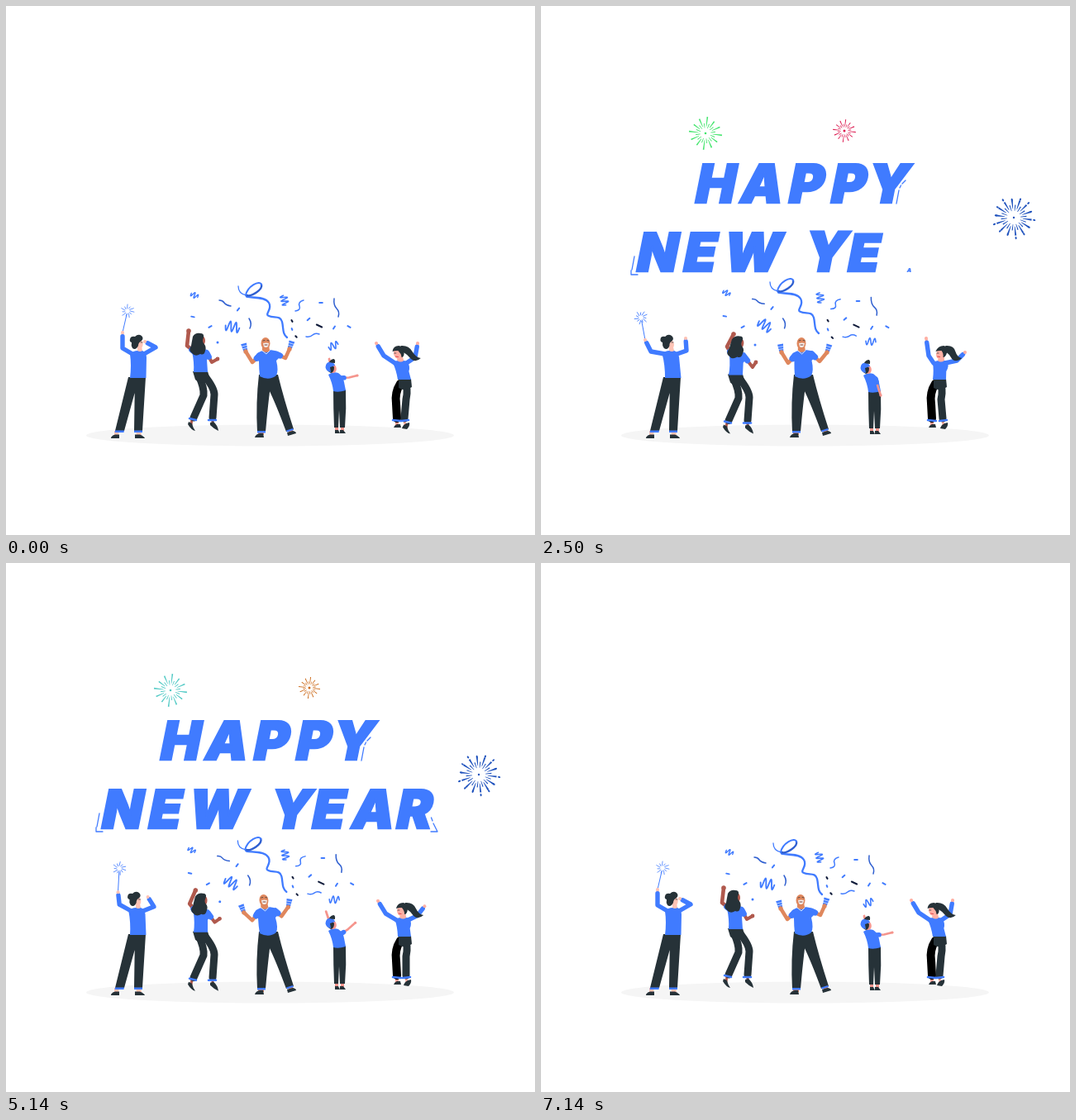
These frames come from a looping animation (640x640 px, 7210 ms). An HTML page with a canvas:

```html
<!DOCTYPE html>
<html lang="en">
<head>
<meta charset="utf-8">
<title>Happy New Year</title>
<style>
  html, body { margin: 0; width: 100%; height: 100%; overflow: hidden; background: #fff; }
  canvas { display: block; width: 100vw; height: 100vh; }
</style>
</head>
<body>
<canvas id="stage" width="640" height="640"></canvas>
<script>
const g = document.getElementById('stage').getContext('2d');
const LOOP = 7210, CUT = 7140, FPS = 0.014;
const BLUE = '#407bff', DEEP = '#2f5fd0', DARK = '#263238', BLACK = '#000';
const KEYS = [0, 1070, 2500, 3360, 4430, 5790, 7070];
let t = 0;

// ---- helpers -------------------------------------------------------------
// Smooth curve through six key values; the swing closes near the third one.
function at(values) {
  const v = [...values, values[2]], last = KEYS.length - 1;
  let i = 0;
  while (i < last - 1 && t >= KEYS[i + 1]) i++;
  const span = KEYS[i + 1] - KEYS[i], u = Math.min(1, (t - KEYS[i]) / span);
  const slope = j => j === 0 || j === last ? 0 : (v[j + 1] - v[j - 1]) / (KEYS[j + 1] - KEYS[j - 1]);
  const u2 = u * u, u3 = u2 * u;
  return v[i] * (2 * u3 - 3 * u2 + 1) + v[i + 1] * (3 * u2 - 2 * u3)
    + span * (slope(i) * (u3 - 2 * u2 + u) + slope(i + 1) * (u3 - u2));
}
const point = (...xy) => [0, 1].map(k => at(xy.filter((_, i) => i % 2 === k)));
const mix = (a, b, u) => [a[0] + (b[0] - a[0]) * u, a[1] + (b[1] - a[1]) * u];

function fill(color, d) {
  g.fillStyle = color;
  g.fill(new Path2D(d));
}
function stroke(color, width, d) {
  g.strokeStyle = color;
  g.lineWidth = width;
  g.stroke(new Path2D(d));
}
const line = (color, width, ...pts) => stroke(color, width, 'M' + pts.join('L'));
function oval(color, x, y, rx, ry = rx, turn = 0) {
  g.fillStyle = color;
  g.beginPath();
  g.ellipse(x, y, rx, ry, turn, 0, 7);
  g.fill();
}
function placed(x, y, turn, draw) {
  g.save();
  g.translate(x, y);
  g.rotate(turn);
  draw();
  g.restore();
}
function leaning(dx, hipY, headY, draw) {
  const k = dx / (hipY - headY);
  g.save();
  g.transform(1, 0, -k, 1, k * hipY, 0);
  draw();
  g.restore();
}
function longSleeve(shoulder, elbow, hand, skin) {
  const cuff = mix(elbow, hand, 0.75);
  line(skin, 3.2, cuff, hand);
  line(BLUE, 5.4, shoulder, elbow, cuff);
  oval(skin, ...hand, 2);
}
function shortSleeve(shoulder, elbow, hand, skin, width = 4) {
  line(skin, width, shoulder, elbow, hand);
  line(BLUE, width + 3, shoulder, mix(shoulder, elbow, 0.4));
  oval(skin, ...hand, width * 0.6);
}

// ---- people --------------------------------------------------------------
function sparklerMan() {
  const skin = '#ffc3b5', lean = at([0, 4, -5, -2, 0, -5]);
  fill(skin, 'M131,514h6l-1,5h-5zM157,514h6l1,5h-6z');
  fill(DARK, 'M148,449h13l-18,65h-11zM156,449h13l-4,65h-10z');
  fill(BLUE, 'M132,513.500h11l-.5,2.500h-11zM155,513.500h10v2.500h-10z');
  fill(DARK, 'M127,523q0,-3 5,-4.500h5v4.500zM156,518.500h6q5,2 6,4.500h-12z');

  const burst = point(147, 369, 141, 369, 121, 377, 132, 372, 139, 369, 133, 371);
  const hand = point(141, 395, 140, 398, 126, 404, 133, 400, 138, 397, 132, 400);
  line(BLUE, 1, hand, mix(hand, burst, 0.84));
  placed(...burst, Math.floor(t * FPS) * 0.7, () => {
    for (let i = 0; i < 11; i++) {
      const a = i * Math.PI * 2 / 11, r = i % 2 ? 6 : 8;
      line(BLUE, 0.8, [Math.cos(a) * 3.2, Math.sin(a) * 3.2], [Math.cos(a + 0.15) * r, Math.sin(a + 0.15) * r]);
    }
  });
  longSleeve([153 + lean * 0.6, 421], point(141, 414, 142, 413, 133, 418, 136, 415, 139, 413, 135, 414), hand, skin);
  longSleeve([167 + lean * 0.5, 421], point(181, 413, 184, 423, 176, 417, 180, 418, 182, 418, 176, 414),
    point(168, 406, 189, 408, 175, 402, 178, 405, 178, 405, 167, 403), skin);
  leaning(lean, 450, 407, () => {
    fill(BLUE, 'M150,421Q154,417 159,417L165,417Q170,419 170,425L169.500,450H150Q152,435 150,421Z');
    fill(skin, 'M159,411h5l1,6q-3,2 -6,0z');
    oval(skin, 161.500, 409, 4.200, 5.500);
    fill(DARK, 'M150,403Q151,399 156,400Q160,396 164,399Q167,402 164,405Q160,407 160,411Q157,417 153,414Q151,411 152,407Q149,406 150,403Z');
    line(DARK, 0.7, [163, 407], [165, 407]);
  });
}

function dancingWoman() {
  const skin = '#b0594d', lean = at([0, -3, 4, 10, 5, 1]), bob = at([0, 4, 3.5, 1, 3.5, 3.5]);
  const leftHand = point(221, 393, 220, 400, 233, 397, 241, 396, 235, 396, 226, 396);
  const leftElbow = point(219, 411, 218, 416, 225, 412, 232, 410, 225, 411, 221, 413);
  g.save();
  g.translate(0, bob);
  line(skin, 3, [225, 500], [224, 506]);
  line(skin, 3, [250, 500], [250, 506]);
  stroke(DARK, 9, 'M240,447Q252,462 252,470L250,498');
  stroke(DARK, 9, 'M233,447Q240,462 239,471L227,498');
  fill(DARK, 'M226,442h18l3,10q-9,8 -18,0z');
  line(BLUE, 2.5, [222, 499], [230, 501]);
  line(BLUE, 2.5, [245, 501], [254, 501]);
  fill(DARK, 'M221,503l4,2q1,5 4,9q-5,-1 -9,-8zM247,504l4,-1q5,4 6,11q-5,-2 -10,-7z');
  g.restore();
  shortSleeve([229 + lean * 0.6, 419 + bob], leftElbow, leftHand, skin, 4.6);
  shortSleeve([243 + lean * 0.6, 420 + bob], point(249, 431, 249, 435, 256, 437, 257, 437, 254, 437, 252, 433),
    point(256, 427, 255, 430, 260, 431, 264, 432, 261, 431, 257, 430), skin, 4);
  g.save();
  g.translate(0, bob);
  leaning(lean, 443, 408, () => {
    fill(BLUE, 'M225,418Q234,413 244,416L247,423L243,428L244,443H227Q228,432 225,418Z');
    oval(skin, 237, 405, 4, 6);
    fill(DARK, 'M226,400Q229,395 235,396Q240,396 239,401Q237,405 239,408Q243,412 241,417Q240,423 235,421Q229,425 225,420Q220,417 224,411Q225,405 226,400Z');
  });
  g.restore();
}

function cup([x, y], turn) {
  placed(x, y, turn, () => {
    fill(BLUE, 'M-2.500,-1L-3.500,-10H3.500L2.500,-1Z');
    stroke('#fff', 0.6, 'M-3,-7H3M-3,-4H3');
  });
}
function cupMan() {
  const skin = '#df875d', lean = at([0, -3, 1, 3, 0, -3]);
  fill(skin, 'M305,514h7v5h-7zM341,511h6v5h-5z');
  fill(DARK, 'M306,446h16Q318,470 314,515H304Q302,480 306,446ZM312,446h17Q336,475 348,512L339,515Q326,480 317,462Z');
  fill(BLUE, 'M304,514h10v2.500h-10zM339,513.500l8,-2.500 1,2 -8,2.500z');
  fill(DARK, 'M301,522q1,-4 6,-5h4l1,5zM340,516l7,-2q4,1 4,3l-10,3z');
  const left = point(290, 418, 287, 427, 291, 419, 295, 416, 290, 419, 287, 425);
  const right = point(343, 415, 340, 419, 346, 419, 347, 417, 343, 416, 341, 417);
  cup(left, at([-0.25, -0.5, -0.15, 0, -0.25, -0.4]));
  cup(right, at([0.3, 0.1, 0.3, 0.4, 0.3, 0.1]));
  shortSleeve([307 + lean * 0.6, 423], point(298, 431, 299, 435, 299, 432, 300, 429, 298, 431, 298, 433), left, skin, 4.4);
  shortSleeve([327 + lean * 0.6, 421], point(338, 426, 331, 431, 337, 430, 339, 427, 336, 427, 332, 428), right, skin, 4.4);
  leaning(lean, 450, 408, () => {
    fill(BLUE, 'M304,420Q310,416 316,417Q324,415 329,419L332,424L327,429Q330,441 327,447Q318,454 307,448Q306,438 306,430L301,424Z');
    fill(skin, 'M310,410h8l1,7q-4,4 -9,0z');
    stroke('#fff', 0.8, 'M310,417L315,421L319,417');
    oval(skin, 314, 408, 5.5, 7);
    fill('#f4f0ee', 'M311,408q4,-1 7,0l-1,4q-3,2 -5,0z');
    line('#7d3d2e', 1, [313, 410], [316, 410]);
    line(DARK, 0.7, [311, 405], [313, 404.500]);
    line(DARK, 0.7, [316, 404.500], [318, 405]);
  });
}

function kid() {
  const skin = '#f5958d', bob = at([-1, 0, 0, -1, -4, 0]);
  const back = point(391, 427, 418, 467, 410, 473, 421, 456, 390, 424, 391, 429);
  const front = point(425, 447, 419, 458, 411, 471, 425, 452, 421, 433, 423, 443);
  const shoulder = [405, 451 + bob];
  line(skin, 2.8, [396, 450 + bob], mix([396, 450 + bob], back, 0.5), back);
  g.save();
  g.translate(0, bob);
  fill(skin, 'M398,509h4v6h-4zM405,509h4v6h-4z');
  fill(DARK, 'M396,465H411Q412,488 410,511H404L403,490L402,511H397Q396,488 396,465Z');
  fill(DARK, 'M398,514h4l2,4h-6zM404,514h4l3,4h-7z');
  fill(BLUE, 'M390,447Q395,443 402,445Q408,449 409,456L411,466Q402,469 396,467Q395,457 390,447Z');
  oval(skin, 396, 440, 3.8, 5);
  fill(DARK, 'M388,437q7,-3 9,1q0,6 -4,7q-5,-2 -5,-8z');
  fill(BLUE, 'M386.500,438Q387,431 393,431.500Q397,432 398,436L392,438L393,444Q387,443 386.500,438Z');
  fill(DARK, 'M391,432q2,-4 6,-4q2,2 1,5q-3,0 -7,-1z');
  g.restore();
  const bend = mix(shoulder, front, 0.5);
  shortSleeve(shoulder, [bend[0], bend[1] + 1], front, skin, 2.6);
}

function ponytailWoman() {
  const skin = '#ffb0a4', lean = at([-5, 4, 4, 0, -2.5, 1]), step = at([0, 4.5, 4, 3.5, 3, 1.5]);
  const shade = '#f39c92';
  fill(shade, 'M471,501h4v6h-4z');
  stroke(BLACK, 10, 'M477,457Q470,468 472,481L473,499');
  line(BLUE, 2.5, [468, 501], [478, 502]);
  fill(DARK, 'M469,510q1,-3 4,-4h4l1,4z');
  line(skin, 3, [482 + step, 501], [483 + step, 507]);
  stroke(DARK, 9, `M482,456Q487,462 484,476L${482 + step},499`);
  fill(DARK, 'M475,451h15l1,10q-8,6 -16,1z');
  line(BLUE, 2.5, [478 + step, 502], [487 + step, 501]);
  placed(step, 0, 0, () => fill(DARK, 'M479,511q1,-4 5,-6l4,-1q1,4 -3,8z'));
  longSleeve([473 + lean * 0.5, 432], point(457, 423, 468, 422, 469, 423, 461, 424, 459, 424, 461, 424),
    point(448, 408, 463, 402, 466, 402, 452, 408, 450, 410, 452, 407), skin);
  longSleeve([487 + lean * 0.5, 432], point(495, 425, 500, 429, 503, 429, 499, 424, 496, 425, 500, 428),
    point(498, 408, 511, 417, 513, 419, 505, 411, 503, 411, 510, 419), skin);
  leaning(lean, 452, 421, () => {
    fill(BLUE, 'M471,431Q480,427 489,430Q492,436 489,442L490,452H474Q474,440 471,431Z');
    fill(DARK, 'M484,411Q494,410 497,418Q500,425 506,426Q499,432 494,427Q490,421 485,418Z');
    fill(skin, 'M478,422h6l1,7q-4,3 -8,0z');
    oval(skin, 479, 421, 5, 6);
    fill(DARK, 'M473,418Q475,411 482,411Q488,412 487,419Q486,425 483,425Q483,420 480,417Q476,417 473,418Z');
    line(DARK, 0.7, [475, 420], [477, 420]);
    line('#e2474f', 1, [476, 424], [479, 424.500]);
  });
}

// ---- confetti ------------------------------------------------------------
function squiggle(x, y, size, turn, waves = 5) {
  placed(x, y, turn, () => {
    const pts = Array.from({ length: 31 }, (_, i) =>
      [size * (i / 15 - 1), Math.sin(i / 30 * Math.PI * waves) * size * 0.7]);
    line(BLUE, 1 + size / 10, ...pts);
  });
}
function confetti() {
  const spread = at([1, 1.02, 1.04, 1.06, 1.055, 1.025]);
  const far = (x, y) => [318 + (x - 318) * spread, 385 + (y - 385) * (1 + (spread - 1) * 2)];
  const spin = (spread - 1) * 10;

  squiggle(...far(228, 350), 4.5, 0.6 + spin * 0.3, 4);
  squiggle(...point(274, 388, 271, 386, 271, 386, 271, 386, 272, 386, 273, 387), 8.5, 0.2 + spin);
  squiggle(...point(337, 356, 338, 355, 338, 353, 338, 352, 338, 352, 338, 354), 6, 1.3 + spin * 0.3);
  squiggle(...point(396, 411, 397, 408, 399, 406, 400, 405, 398, 406, 397, 408), 6, -0.3 + spin, 4);

  const curves = [
    [265, 359, 'M-7,-3Q-3,-3 -1,0T7,4'],
    [355, 362, 'M5,-6Q-2,-4 0,1T-5,7'],
    [399, 365, 'M-2,-11Q-3,-3 1,1T3,11'],
    [371, 399, 'M-8,1Q-3,2 0,-1T8,-2'],
    [295, 384, 'M-1,-6Q3,0 0,6'],
  ];
  curves.forEach(([x, y, d], i) =>
    placed(...far(x, y), spin * (i % 2 ? 0.3 : -0.2), () => stroke(i % 2 ? BLUE : DEEP, 1.5, d)));

  const dashes = [
    [226, 376, 0.2], [247, 388, -0.5], [281, 367, -0.9], [366, 379, -0.7], [381, 359, 0],
    [397, 389, -1], [415, 388, 0.5], [346, 391, 1.2], [346, 381, 1], [351, 400, 0.8], [379, 387, 0.45],
  ];
  dashes.forEach(([x, y, turn], i) => {
    const half = i === 10 ? 3.5 : i > 6 ? 1 : 1.8;
    placed(...far(x, y), turn, () => line(i > 7 ? '#101b3a' : BLUE, 2, [-half, 0], [half, 0]));
  });
  oval(BLUE, ...point(256, 407, 257, 408, 259, 410, 261, 411, 261, 411, 257, 409), 1.5);

  placed(...point(0, 0, -6, -2, -4, -5, -3, -7, -1, -5, -1, -2), 0, () => {
    stroke(BLUE, 1.3, 'M281,339C281,345 285,349 291,350');
    stroke(BLUE, 2.3, 'M291,350C288,355 312,349 318,359C323,367 312,373 318,375C324,378 332,374 334,382C336,390 334,396 340,401');
    stroke(DEEP, 2.4, 'M291,350C297,352 311,343 309,337');
    stroke(BLUE, 2, 'M309,337C307,331 292,339 290,350');
  });
}

// ---- fireworks -----------------------------------------------------------
const FIREWORKS = [
  { x: 128, y: 173, r: 28, rays: 24, starts: [800, 3480], colors: ['#dbe67a', '#dbe67a'] },
  { x: 199, y: 154, r: 22, rays: 24, starts: [1780, 4415], colors: ['#41e56b', '#4fc9c4'] },
  { x: 572, y: 256, r: 26, rays: 28, starts: [2060, 4690], colors: ['#1f52bd', '#1f52bd'], tips: true },
  { x: 367, y: 151, r: 25, rays: 24, starts: [2400, 5050], colors: ['#dc1a50', '#cc6a1a'] },
  { x: 489, y: 163, r: 53, rays: 40, starts: [2740, 5370], colors: ['#10e0b6', '#16c4d2'], tips: true, ring: true },
];
function firework({ x, y, r, rays, starts, colors, tips, ring }) {
  starts.forEach((start, n) => {
    const age = t - start;
    if (age < 0 || age > 1060) return;
    const grow = 1 - (1 - Math.min(1, age / 300)) ** 2;
    const R = r * grow * (1 - Math.max(0, age - 420) / 3500), color = colors[n];
    g.save();
    g.globalAlpha = Math.min(1, Math.max(0, (1060 - age) / 260));
    g.translate(x, y);
    for (let i = 0; i < rays; i++) {
      g.save();
      g.rotate(i * Math.PI * 2 / rays + 0.12);
      const long = i % 2 === 0, uneven = 1 - (i % 3) * 0.06;
      const from = R * (long ? 0.42 : 0.32), to = R * (long ? (tips ? 0.84 : uneven) : 0.6);
      const w = R * (ring ? 0.022 : 0.04) * (long ? 1 : 0.6);
      fill(color, `M${from},-0.3L${to},${-w}L${to},${w}L${from},0.3Z`);
      if (tips && long) oval(color, R * uneven - 1, 0, w * 1.6, w);
      g.restore();
    }
    if (ring) {
      g.beginPath();
      g.arc(0, 0, R * 0.2, 0, 7);
      g.strokeStyle = color;
      g.lineWidth = R * 0.07;
      g.stroke();
      for (let i = 0; i < 16; i++) {
        const a = i * Math.PI / 8;
        oval(color, Math.cos(a) * R * 0.25, Math.sin(a) * R * 0.25, R * 0.035);
      }
    } else oval(color, 0, 0, tips ? 1.2 : r * 0.06);
    g.restore();
  });
}

// ---- greeting ------------------------------------------------------------
const LINES = [
  { text: 'HAPPY', y: 239, centers: [213, 268.5, 323.5, 374.5, 422] },
  { text: 'NEWYEAR', y: 322, centers: [142.5, 194, 257.5, 346, 392, 445.5, 497] },
];
const MARKS = {
  4: 'M430,239L433,223M434,220L435.500,217M437,215L441,211',
  5: 'M113,303L110,319M109,320V325H117',
  11: 'M514.500,308L516,312M517,315L522,325H514',
};
const CAP = 49, SLANT = 0.2, LETTER_DELAY = 211;
function pop(age) {
  if (age <= 0) return 0;
  if (age < 340) return 1.1 * Math.sin(Math.PI / 2 * age / 340);
  return 1 + 0.1 * (1 + Math.cos(Math.PI * Math.min(1, (age - 340) / 160))) / 2;
}
function greeting() {
  g.font = '900 64.5px Inter, "Open Sans", sans-serif';
  let index = 0;
  for (const { text, y, centers } of LINES) {
    [...text].forEach((letter, i) => {
      const age = t - 370 - LETTER_DELAY * index, scale = pop(age);
      if (scale > 0) {
        const box = g.measureText(letter);
        const dx = (box.actualBoundingBoxLeft - box.actualBoundingBoxRight) / 2;
        g.save();
        g.translate(centers[i], y);
        g.scale(scale, scale);
        g.transform(1, 0, -SLANT, 1, -SLANT * CAP / 2, 0);
        g.fillStyle = g.strokeStyle = BLUE;
        g.lineWidth = 2.4;
        g.lineJoin = 'miter';
        g.miterLimit = 3;
        g.fillText(letter, dx, -1.2);
        g.strokeText(letter, dx, -1.2);
        g.restore();
      }
      if (MARKS[index] && age > 400) stroke(BLUE, 1.3, MARKS[index]);
      index++;
    });
  }
}

// ---- loop ----------------------------------------------------------------
function draw(now) {
  const step = Math.floor(((now % LOOP) + 5) * FPS) / FPS;
  t = step >= CUT ? 0 : step;
  g.fillStyle = '#fff';
  g.fillRect(0, 0, 640, 640);
  g.lineCap = g.lineJoin = 'round';
  oval('#f5f5f5', 319.5, 519.5, 222.5, 13);
  FIREWORKS.forEach(firework);
  greeting();
  confetti();
  sparklerMan();
  dancingWoman();
  cupMan();
  kid();
  ponytailWoman();
}
const begin = performance.now();
function frame() {
  draw(performance.now() - begin);
  requestAnimationFrame(frame);
}
frame();
</script>
</body>
</html>
```
